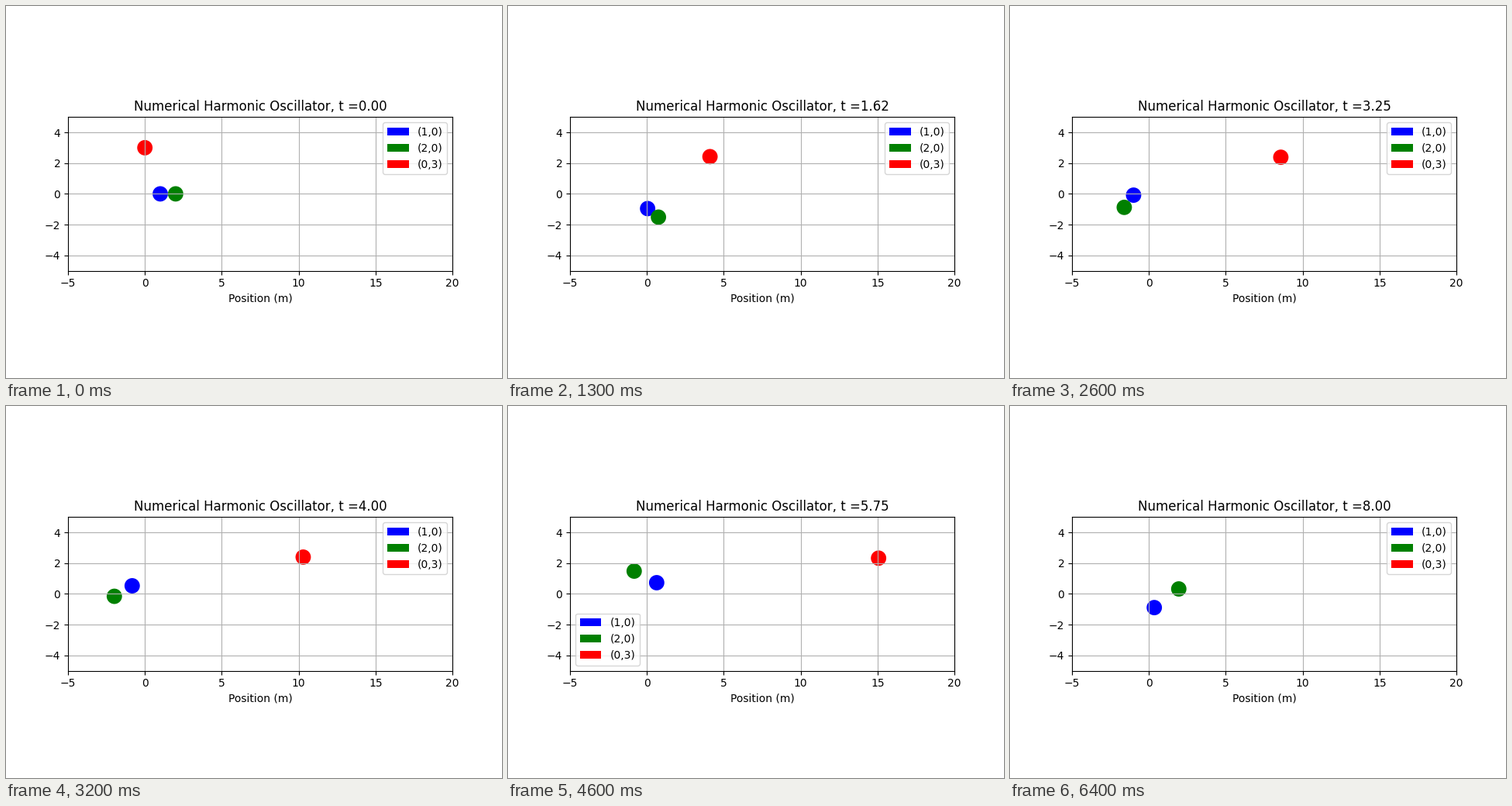
Animation, 640 px wide and 480 px high, one loop 6.5 s. Source, as a matplotlib script:

```python
import numpy as np
import matplotlib.pyplot as plt
from matplotlib.animation import FuncAnimation

FRAMES = 65
STEP = 0.125      # simulated seconds per frame
SUBSTEPS = 20
RADIUS = 0.5
STARTS = [(1, 0), (2, 0), (0, 3)]
COLORS = ["blue", "green", "red"]


def slope(state):
    """Pendulum equation for rows of (angle, angular velocity)."""
    angle, speed = state.T
    return np.column_stack([speed, -np.sin(angle)])


def rk4(state, dt):
    k1 = slope(state)
    k2 = slope(state + dt / 2 * k1)
    k3 = slope(state + dt / 2 * k2)
    k4 = slope(state + dt * k3)
    return state + dt / 6 * (k1 + 2 * k2 + 2 * k3 + k4)


def solve():
    states = [np.array(STARTS, dtype=float)]
    for _ in range(FRAMES - 1):
        state = states[-1]
        for _ in range(SUBSTEPS):
            state = rk4(state, STEP / SUBSTEPS)
        states.append(state)
    return states


path = solve()

fig, ax = plt.subplots(figsize=(6.4, 4.8), dpi=100)
ax.set_aspect("equal")
ax.set_xlim(-5, 20)
ax.set_ylim(-5, 5)
ax.set_xticks(range(-5, 21, 5))
ax.set_yticks(range(-4, 5, 2))
ax.set_xlabel("Position (m)")
ax.grid(True)
title = ax.set_title("")

balls = []
for (x, v), color in zip(STARTS, COLORS):
    ball = plt.Circle((x, v), RADIUS, fc=color, label=f"({x},{v})")
    balls.append(ax.add_patch(ball))

# "best" is worked out on every draw, so the legend dodges the balls
ax.legend(handles=balls, loc="best")


def update(frame):
    for ball, center in zip(balls, path[frame]):
        ball.center = tuple(center)
    title.set_text(f"Numerical Harmonic Oscillator, t ={frame * STEP:.2f}")
    return [*balls, title]


def init():
    return update(0)


anim = FuncAnimation(fig, update, frames=FRAMES, init_func=init,
                     interval=100, repeat=True, repeat_delay=0, blit=False)
plt.show()
```
